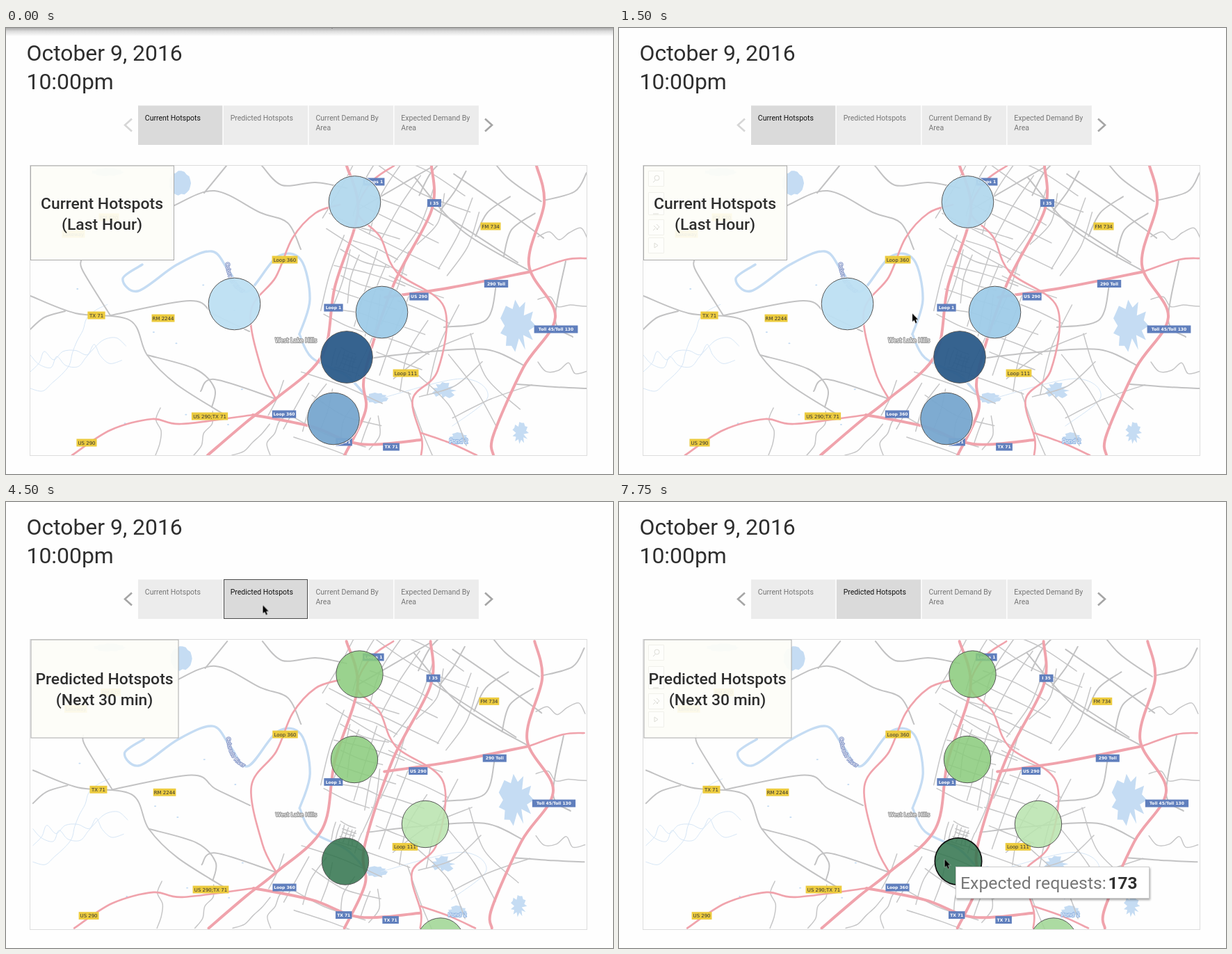
Recreate the animation shown at these times as an HTML page. Size 873x641 px, loop 8 s.

```html
<!DOCTYPE html>
<html lang="en">
<head>
<meta charset="utf-8">
<title>Hotspots</title>
<style>
html, body { margin: 0; width: 100%; height: 100%; overflow: hidden; background: #fefefe; }
svg { display: block; width: 100vw; height: 100vh; font-family: Roboto, sans-serif; }
svg * { animation: 8s step-end infinite; }

.line { fill: none; stroke-linecap: round; stroke-linejoin: round; }
.highway { stroke: #f0a3ac; stroke-width: 4; }
.route { stroke: #f0a3ac; stroke-width: 2.7; }
.street { stroke: #c2c2c3; stroke-width: 2; }
.lane { stroke: #c6c6c7; stroke-width: 1.5; }
.river { stroke: #c5dcf3; stroke-width: 3.4; }
.stream { stroke: #d5e5f5; stroke-width: 1; }
.lake { fill: #c5dcf3; }
.sign text { font: 7px "DejaVu Sans", sans-serif; text-anchor: middle; fill: #333; }
.sign rect { fill: #eccb3f; }
.sign.blue text { font-weight: bold; font-size: 6px; fill: #fff; }
.sign.blue rect { fill: #607fbd; }
.place { font: 8px "DejaVu Sans", sans-serif; fill: #fff; paint-order: stroke; stroke-width: 2.2px; stroke-linejoin: round; text-anchor: middle; }

.heading { font-size: 31.9px; fill: #2e2e2e; }
.tab rect { fill: #ececec; }
.tab text { font-size: 10.5px; fill: #767676; }
.chevron { fill: none; stroke: #a5a5a5; stroke-width: 2.6; }
.card rect { fill: #fdfdf8; fill-opacity: .92; stroke: #aaa; }
.card text { font-size: 22.9px; font-weight: 500; fill: #2e2e2e; text-anchor: middle; }
.spot { stroke: #555; stroke-width: 1; }
.tools { fill: #fff; fill-opacity: .45; stroke: #f0f0ea; }
.tools .icon { fill: none; stroke: #dcdcd6; }

#map { animation-name: zoom; }
.before { animation-name: before; }
.after { animation-name: after; }
#tab0 rect { animation-name: offFill; }
#tab0 text { animation-name: offText; }
#tab1 rect { animation-name: onFill; }
#tab1 text { animation-name: onText; }
#back { animation-name: backTone; }
#hover { animation-name: hover; }
#shadow { animation-name: shadow; }
.tools { animation-name: tools; }
#focus { animation-name: focus; }
#tip { animation-name: tip; }
#cursor { animation-name: move; }

@keyframes zoom { 0% { transform: none } 56.25%, 100% { transform: matrix(.991, 0, 0, .991, 4.1, 4) } }
@keyframes before { 0% { visibility: visible } 56.25%, 100% { visibility: hidden } }
@keyframes after { 0% { visibility: hidden } 56.25%, 100% { visibility: visible } }
@keyframes offFill { 0% { fill: #dadada } 56.25%, 100% { fill: #ececec } }
@keyframes onFill { 0% { fill: #ececec } 56.25%, 100% { fill: #dadada } }
@keyframes offText { 0% { fill: #111 } 56.25%, 100% { fill: #767676 } }
@keyframes onText { 0% { fill: #767676 } 56.25%, 100% { fill: #111 } }
@keyframes backTone { 0% { stroke: #d6d6d6 } 56.25%, 100% { stroke: #a5a5a5 } }
@keyframes hover { 0% { opacity: 0 } 43.75% { opacity: 1 } 78.125%, 100% { opacity: 0 } }
@keyframes shadow { 0% { opacity: 1 } 9.375% { opacity: .75 } 12.5%, 100% { opacity: 0 } }
@keyframes tools { 0% { opacity: 0 } 18.75% { opacity: 1 } 43.75% { opacity: 0 } 81.25%, 100% { opacity: 1 } }
@keyframes focus { 0% { stroke: #555; stroke-width: 1 } 96.875%, 100% { stroke: #111; stroke-width: 1.7 } }
@keyframes tip { 0% { opacity: 0 } 96.875%, 100% { opacity: 1 } }
@keyframes move {
  0% { transform: translate(464px, -13px) }
  3.125% { transform: translate(153px, 70px) }
  6.25% { transform: translate(67px, 66px) }
  9.375% { transform: translate(312.5px, 314px) }
  12.5% { transform: translate(372.5px, 388px) }
  15.625% { transform: translate(422px, 410.500px) }
  31.25% { transform: translate(437.5px, 399.500px) }
  34.375% { transform: translate(438.5px, 361.500px) }
  37.5% { transform: translate(416.5px, 298.500px) }
  40.625% { transform: translate(388.5px, 212.500px) }
  43.75% { transform: translate(372.5px, 155px) }
  46.875% { transform: translate(369.5px, 148.500px) }
  78.125% { transform: translate(367px, 176px) }
  81.25% { transform: translate(353.5px, 240.500px) }
  84.375% { transform: translate(353.5px, 317px) }
  87.5% { transform: translate(368px, 389.500px) }
  90.625% { transform: translate(400.500px, 439px) }
  93.75% { transform: translate(442.500px, 482.500px) }
  96.875%, 100% { transform: translate(468.500px, 513.500px) }
}
</style>
</head>
<body>
<svg viewBox="0 0 873 641" preserveAspectRatio="none">
  <defs>
    <clipPath id="frame"><rect x="35" y="198" width="800" height="416"/></clipPath>
    <linearGradient id="fade" x2="0" y2="1">
      <stop stop-color="#aaa"/><stop offset=".4" stop-color="#ddd"/><stop offset="1" stop-color="#fefefe"/>
    </linearGradient>
    <filter id="soft" x="-5%" y="-20%" width="110%" height="150%">
      <feDropShadow dx="1" dy="2" stdDeviation="1.6" flood-opacity=".35"/>
    </filter>
  </defs>
  <rect width="873" height="641" fill="#fefefe"/>
  <rect id="shadow" width="873" height="12" fill="url(#fade)"/>
  <text class="heading" x="29.5" y="46.5">October 9, 2016</text>
  <text class="heading" x="29.5" y="88">10:00pm</text>

  <g id="tabs"></g>
  <path id="back" class="chevron" d="M181 130.500l-10 9 10 9"/>
  <path class="chevron" d="M689 130.500l10 9-10 9"/>
  <rect id="hover" x="313.5" y="111.500" width="120" height="56" fill="none" stroke="#4c4c4c"/>

  <g clip-path="url(#frame)">
    <g id="map">
      <g id="land"></g>
      <g id="signs"></g>
      <text class="place" x="417" y="452" stroke="#999">West Lake Hills</text>
      <text class="place" x="651" y="597" stroke="#8fb4e2">Pond 2</text>
      <path id="bend" d="M316 337Q319 374 345 382" fill="none"/>
      <text class="place" style="font-size:7.2px;text-anchor:start" stroke="#8d9dcb"><textPath href="#bend">Colorado River</textPath></text>
    </g>
    <g id="current" class="before"></g>
    <g id="predicted" class="after"></g>
  </g>
  <rect x="34.500" y="197.500" width="801" height="417" fill="none" stroke="#ddd"/>

  <g class="card">
    <rect class="before" x="35.500" y="198" width="206" height="135.500"/>
    <rect class="after" x="36" y="198" width="212" height="141"/>
    <g class="tools">
      <path d="M42.500 205.500h22v22h-22zM42.500 236.500h22v32h-22zM42.500 275.500h22v22h-22zM42.500 301.500h22v22h-22z"/>
      <path class="icon" d="M52 219l-3 3M49 267h8M49 291l3-3M50 284l6 6M54 282l4 4-4 4M51 309l5 3.500-5 3.500z"/>
      <circle class="icon" cx="54.500" cy="215.500" r="3.500"/>
    </g>
    <g class="before"><text x="138" y="260">Current Hotspots</text><text x="138" y="290">(Last Hour)</text></g>
    <g class="after"><text x="141.5" y="262">Predicted Hotspots</text><text x="141.5" y="292">(Next 30 min)</text></g>
  </g>

  <g id="tip">
    <rect x="484.500" y="524.500" width="278" height="45" fill="#fff" stroke="#ccc" filter="url(#soft)"/>
    <text x="491" y="556" font-size="24.8" fill="#777">Expected requests:</text>
    <text x="703.500" y="556" font-size="24.4" font-weight="700" fill="#2e2e2e">173</text>
  </g>
  <path id="cursor" d="M0 0V11.500L2.600 9.200 4.600 13.700 6.500 12.900 4.600 8.500H8.200Z" stroke="#fff" stroke-width=".8" paint-order="stroke"/>
</svg>
<script>
const byId = id => document.getElementById(id);
const land = byId('land');

let seed = 9;
const random = () => (seed = seed * 16807 % 2147483647) / 2147483647;
const spread = size => (random() - .5) * size;

function add(parent, tag, attrs, text) {
  const node = document.createElementNS('http://www.w3.org/2000/svg', tag);
  for (const key in attrs) node.setAttribute(key, attrs[key]);
  if (text) node.textContent = text;
  return parent.appendChild(node);
}

// Catmull-Rom curve through [x, y] points.
function curve(points) {
  const at = i => points[Math.max(0, Math.min(points.length - 1, i))];
  let d = `M${at(0)}`;
  for (let i = 0; i < points.length - 1; i++) {
    const [a, b, c, e] = [at(i - 1), at(i), at(i + 1), at(i + 2)];
    const lead = b.map((v, k) => v + (c[k] - a[k]) / 6);
    const tail = c.map((v, k) => v - (e[k] - b[k]) / 6);
    d += `C${lead} ${tail} ${c}`;
  }
  return d;
}
const line = (kind, ...points) => add(land, 'path', { class: `line ${kind}`, d: curve(points) });

// A line that drifts off its heading as it goes.
function wander(kind, x, y, heading, steps, drift = .9) {
  const points = [[x, y]];
  for (let i = 0; i < steps; i++) {
    const turn = heading + spread(drift * 2);
    points.push([x += 18 * Math.cos(turn), y += 18 * Math.sin(turn)]);
  }
  line(kind, ...points);
}

// Two crossing sets of slightly bent streets, turned by angle degrees.
function mesh(kind, cx, cy, width, height, gap, angle) {
  const turn = angle * Math.PI / 180;
  const place = (u, v) => [cx + u * Math.cos(turn) - v * Math.sin(turn), cy + u * Math.sin(turn) + v * Math.cos(turn)];
  for (const [span, depth, flip] of [[width, height, false], [height, width, true]])
    for (let v = -depth / 2; v <= depth / 2; v += gap * (.7 + random() * .6)) {
      const start = -span / 2 + random() * span * .3, end = span / 2 - random() * span * .3;
      const points = [start, (start + end) / 2, end].map(u => [u, v + spread(gap * .5)]);
      line(kind, ...points.map(([u, w]) => flip ? place(w, u) : place(u, w)));
    }
}

function lake(x, y, rx, ry, rough) {
  const corners = Array.from({ length: 22 }, (_, i) => {
    const a = i / 22 * 2 * Math.PI, r = 1 - rough * (i % 2 ? .7 : 0) * random();
    return [x + rx * r * Math.cos(a), y + ry * r * Math.sin(a)];
  });
  add(land, 'path', { class: 'lake', d: `M${corners.join('L')}Z` });
}

function sign(text, x, y, blue) {
  const g = add(byId('signs'), 'g', { class: blue ? 'sign blue' : 'sign' });
  const width = text.length * (blue ? 3.55 : 3.85) + 6;
  add(g, 'rect', { x: x - width / 2, y: y - 5.5, width, height: 11 });
  add(g, 'text', { x, y: y + (blue ? 2.2 : 2.6) }, text);
}

function spot(view, x, y, fill, id) {
  const r = view === 'current' ? 37.3 : 33.7;
  if (view === 'current') add(byId(view), 'circle', { cx: x, cy: y, r: r + 1, fill: 'none', stroke: '#fff' });
  add(byId(view), 'circle', { class: 'spot', cx: x, cy: y, r, fill, 'fill-opacity': view === 'current' ? .95 : .86, ...(id && { id }) });
}

[['Current Hotspots'], ['Predicted Hotspots'], ['Current Demand By', 'Area'], ['Expected Demand By', 'Area']].forEach((words, i) => {
  const x = 190 + i * 122.85;
  const g = add(byId('tabs'), 'g', { class: 'tab', id: 'tab' + i });
  add(g, 'rect', { x, y: 111.5, width: 121.3, height: 56.5 });
  words.forEach((word, k) => add(g, 'text', { x: x + 9.8, y: 132.5 + k * 14 }, word));
});

// Water
lake(250, 223, 16, 18, .2);
lake(146, 207, 24, 6, .3);
lake(736, 428, 26, 38, .8);
lake(651, 590, 14, 9, .5);
lake(740, 582, 12, 16, .9);
lake(630, 521, 18, 12, .8);
lake(533, 532, 17, 8, .5);
line('river', [196, 340], [168, 360], [190, 378], [246, 340], [296, 321], [321, 350], [347, 379], [390, 329], [424, 333], [437, 390], [422, 440]);
line('river', [422, 440], [440, 474], [490, 500], [520, 532]);
line('stream', [540, 532], [655, 504], [693, 530], [642, 572]);
for (let i = 0; i < 3; i++) wander('stream', 35, 470 + i * 24, -.15, 10, 1.3);
for (let i = 0; i < 9; i++) lake(60 + random() * 300, 345 + random() * 240, 1.5, 1, 0);

// Local streets
mesh('lane', 575, 270, 200, 140, 27, 28);
mesh('lane', 520, 370, 110, 150, 19, 17);
mesh('lane', 575, 450, 110, 150, 32, 20);
mesh('lane', 490, 482, 40, 36, 7, 18);
mesh('lane', 470, 560, 170, 90, 27, 22);
mesh('street', 700, 265, 190, 120, 50, 35);
mesh('lane', 665, 520, 170, 150, 48, -32);
for (let i = 0; i < 4; i++) wander('lane', 215 + i * 55, 614, -1.2, 4);
for (let i = 0; i < 3; i++) wander('lane', 765, 300 + i * 90, .2, 5);

// Country roads
line('street', [35, 385], [100, 410], [178, 420], [203, 470], [245, 512], [318, 558]);
line('street', [35, 433], [55, 416], [85, 407]);
line('street', [150, 413], [265, 392], [300, 412], [350, 436]);
line('street', [108, 334], [111, 350], [150, 413]);
line('street', [242, 255], [300, 234], [365, 265], [405, 280], [424, 318]);
line('street', [285, 237], [317, 198]);
line('street', [368, 198], [397, 226], [445, 222], [490, 230]);
line('street', [203, 470], [272, 490], [300, 518], [296, 545]);
line('street', [280, 522], [300, 505], [388, 533]);
line('street', [505, 262], [560, 230], [612, 200]);
line('street', [588, 215], [657, 292], [755, 350]);
line('street', [630, 430], [690, 420], [705, 370]);
line('street', [520, 475], [600, 466], [690, 462], [745, 485]);
line('street', [735, 512], [790, 516], [835, 518]);
line('street', [835, 208], [818, 235], [773, 248]);
line('street', [805, 335], [790, 420], [815, 444]);

// Highways
line('route', [95, 614], [150, 578], [210, 562], [252, 569], [355, 556]);
line('highway', [355, 556], [440, 573], [510, 598], [597, 592]);
line('route', [597, 582], [640, 597], [677, 614]);
line('route', [480, 254], [445, 266], [412, 302], [388, 358], [352, 408], [368, 492], [388, 533]);
line('highway', [490, 198], [506, 265], [473, 372], [455, 470], [388, 533], [345, 567], [290, 614]);
line('route', [558, 198], [525, 222], [506, 265], [538, 300], [562, 351], [630, 401], [621, 492], [585, 533], [598, 590], [597, 614]);
line('highway', [612, 198], [612, 262], [557, 370], [516, 496], [517, 550], [487, 614]);
line('highway', [545, 387], [640, 373], [755, 350]);
line('route', [755, 350], [805, 333], [835, 331]);
line('highway', [763, 198], [774, 252], [752, 340], [790, 415], [744, 488], [701, 585], [701, 614]);

// Road signs
sign('TX 71', 130, 413);
sign('RM 2244', 226, 417);
sign('Loop 360', 401, 333);
sign('FM 734', 697, 285);
sign('Loop 111', 575, 496);
sign('US 290;TX 71', 293, 558);
sign('US 290', 116, 596);
sign('RM 620', 148, 272);
sign('Lakeway', 97, 296);
sign('Loops 1', 529, 221, true);
sign('I 35', 616, 251.5, true);
sign('290 Toll', 705, 367.5, true);
sign('US 290', 594, 386, true);
sign('Loop 1', 471, 402, true);
sign('Toll 45/Toll 130', 791, 433, true);
sign('Loop 360', 400, 555, true);
sign('TX 71', 486, 595, true);
sign('TX 71', 554, 602, true);

spot('current', 501.5, 250, '#b3d8ee');
spot('current', 328.5, 396.5, '#bde0f3');
spot('current', 540.5, 408.5, '#9fcce8');
spot('current', 490, 473, '#2c5b8a');
spot('current', 471, 561.5, '#78a7cf');
spot('predicted', 508.5, 247.5, '#8acb7c');
spot('predicted', 501, 370, '#8acb7c');
spot('predicted', 603, 463, '#b8e4ae');
spot('predicted', 488, 516.5, '#31744d', 'focus');
spot('predicted', 625, 631.5, '#9fd693');
</script>
</body>
</html>
```
